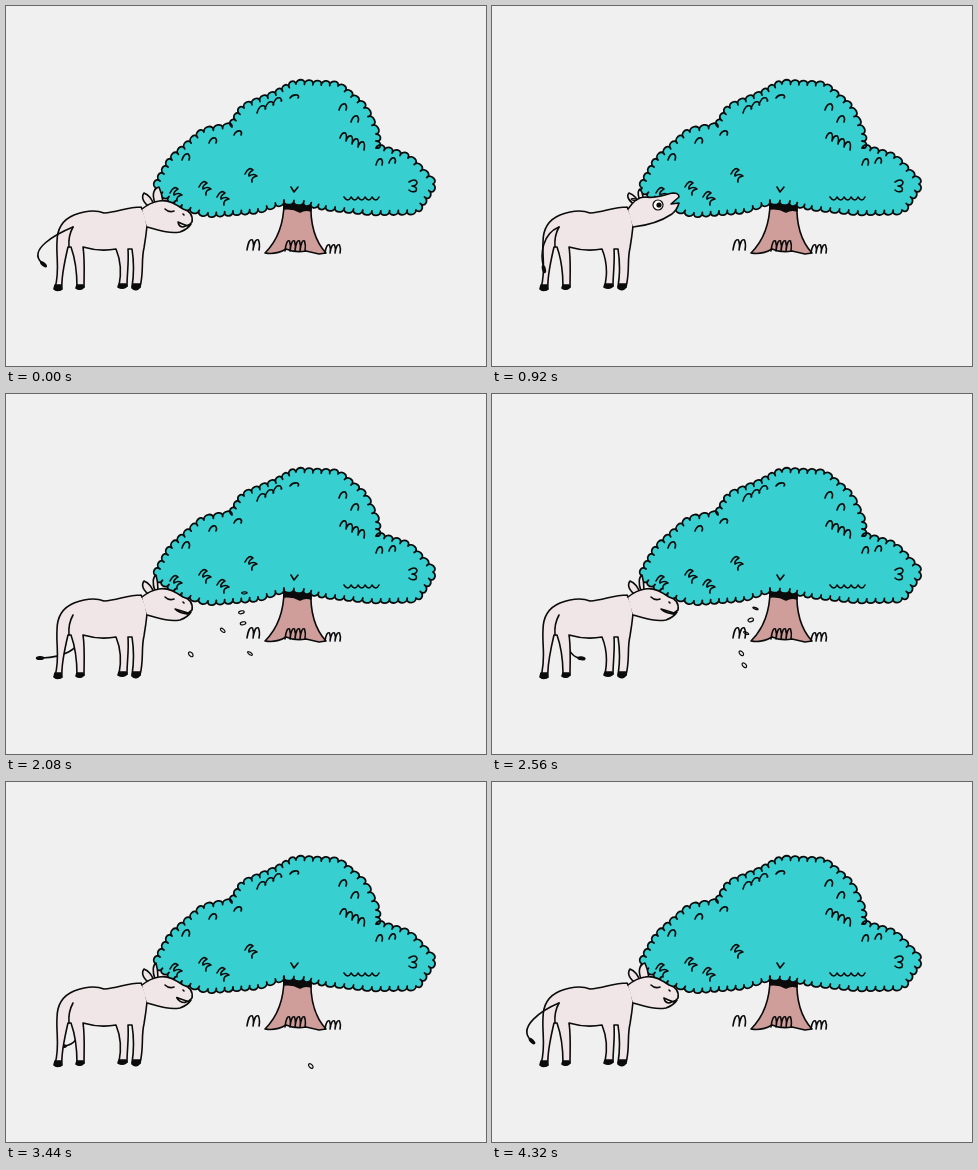
An HTML page for the animation above (4.36 s loop, 480 by 360 pixels).

```html
<!DOCTYPE html>
<html lang="en">
<head>
<meta charset="utf-8">
<title>Donkey and tree</title>
<style>
html, body { margin: 0; width: 100%; height: 100%; overflow: hidden; background: #f0f0f0; }
svg { display: block; width: 100vw; height: 100vh; }
.ink { fill: none; stroke: #0b0b0b; stroke-width: 1.6; stroke-linecap: round; stroke-linejoin: round; }
.skin { fill: #f0e6e7; }
.solid { fill: #0b0b0b; }
.thin { stroke-width: 1.2; }
</style>
</head>
<body>
<svg viewBox="0 0 480 360">
  <g class="ink">
    <path fill="#cf9e9b" d="M278 196C278 219 270 236 259 247Q270 249 280 243Q289 247 300 245L313 248L320 247C308 234 304 217 305 196Z"/>
    <path class="solid" d="M278 195H305V205Q299 203 294 206Q287 202 278 203Z"/>
    <path id="grass"/>
  </g>
  <path id="crown" class="ink" fill="#38cfd0" style="fill:#38cfd0;stroke-width:1.8"/>
  <path id="marks" class="ink"/>

  <g id="back"></g>
  <path class="ink skin" d="M135 201C121 201 112 206 98 207C88 203 76 206 68 209C56 214 51 224 51 236C50 252 54 265 49 282Q52 286 56 283C55 272 58 258 62 241L65 241C70 255 71 268 71 281Q74 285 78 281C78 268 79 254 77 241Q94 246 110 243Q117 260 113 280Q117 283 121 280C121 268 123 256 122 243L126 243Q129 262 126 281Q130 285 134 281C138 266 135 254 138 242Q140 230 141 220Q140 208 135 201"/>
  <path class="ink" d="M67 221Q62 230 63 241"/>
  <path class="ink solid" d="M49 279H55V283Q51 286 48 283ZM71 279H77L78 281Q74 285 70 282ZM113 278H120L121 280Q117 284 112 281ZM127 278H134V281Q130 286 126 282Z"/>
  <g id="front"></g>

  <g id="tail">
    <path id="tailLine" class="ink"/>
    <ellipse id="tuft" class="solid" rx="4.2" ry="2"/>
  </g>

  <g id="chew" class="ink">
    <path id="farEar" class="skin"/>
    <path class="skin" d="M144 201C137 197 135 191 138 187C143 189 146 193 148 199"/>
    <path id="face" class="skin"/>
    <path d="M159 203Q163 207 168 205M177 208L178 209"/>
  </g>
  <g id="bite" class="ink">
    <path class="skin" d="M144 199C137 196 134 190 137 187C142 189 145 192 147 197M147 192Q145 185 148 183Q151 187 151 191"/>
    <path class="skin" d="M136 203C140 197 146 191 153 191C164 193 174 188 181 187Q187 187 187 191L179 198L187 197Q185 204 180 208C171 214 160 219 141 221"/>
    <circle cx="166" cy="199" r="5" fill="#fff" stroke-width="1.2"/>
    <circle cx="167" cy="199" r="2.6" class="solid" stroke="none"/>
  </g>

  <g id="leaves" class="ink thin"></g>
</svg>
<script>
const LOOP = 4360, STEP = 40, GROUND = 284;
const get = id => document.getElementById(id);
const setPath = (id, d) => get(id).setAttribute('d', d);
const wave = x => Math.cos(2 * Math.PI * x);

// Crown: leafy bumps, leaning forward, along a clockwise outline.
const rim = [[150,182],[166,154],[198,126],[226,121],[238,102],[270,89],[290,78],
  [332,80],[358,102],[370,128],[370,142],[402,152],[427,178],[410,204],[366,205],
  [320,200],[298,195],[278,194],[252,203],[202,207],[176,199]];

function leafy(points) {
  let path = 'M' + points[0];
  points.forEach(([x, y], i) => {
    const [nx, ny] = points[(i + 1) % points.length];
    const length = Math.hypot(nx - x, ny - y), count = Math.round(length / 8.5);
    const dx = (nx - x) / count, dy = (ny - y) / count;
    const out = 6 * count / length;
    for (let k = 0; k < count; k++) {
      path += `c${dy * out} ${-dx * out} ${dx * 1.2 + dy * out} ${dy * 1.2 - dx * out} ${dx} ${dy}`;
    }
  });
  return path + 'Z';
}
setPath('crown', leafy(rim));

// A row of n hooks, each w wide and h tall, climbing by rise.
function hooks(x, y, n, w, h, rise = 0) {
  const hook = `q${w * 0.3} ${-h * 1.2} ${w * 0.9} ${-h}q${w * 0.3} ${h * 0.4} ${w * 0.1} ${h - rise}`;
  return `M${x} ${y}` + hook.repeat(n);
}

setPath('grass', hooks(241, 244, 2, 6, 10) + hooks(279, 245, 4, 5, 10) + hooks(319, 247, 3, 5, 8));

// A slanted squiggle of two strokes.
const squiggle = (x, y) => `M${x} ${y}q4 -8 8 -4q-5 3 -4 6q5 -3 8 0q-6 1 -5 6`;

setPath('marks', [
  hooks(251, 107, 3, 8, 7, 4), hooks(284, 92, 1, 8, 3), hooks(228, 129, 1, 7, 4),
  hooks(203, 137, 1, 7, 5), hooks(176, 154, 1, 7, 6), hooks(333, 104, 1, 7, 6),
  hooks(345, 116, 1, 7, 6), hooks(334, 132, 4, 6, 5, -3),
  hooks(370, 159, 1, 6, 6), hooks(383, 157, 1, 6, 5),
  squiggle(239, 168), squiggle(193, 181), squiggle(211, 191), squiggle(164, 187),
  'M338 191' + 'q4 6 7 0'.repeat(5),
  'M285 181l3 5l4 -5M403 176q6 -4 8 0q0 4 -5 4q6 1 4 5q-4 2 -7 -1'
].join(''));

// Tail swing: -1 is far left, 1 far right.
function swing(t) {
  if (t < 1200) return -0.7 - 0.3 * wave(t / 600);
  return wave((t - 2520) / (t < 2520 ? 880 : 1260));
}

function drawTail(t) {
  const s = swing(t), inFront = t < 1200 || t > 4100;
  const x = 62 + 26 * s, y = 264 + (inFront ? 7 * s : 0);
  const cx = inFront ? x + 5 + 20 * s : (x + 74) / 2, cy = inFront ? y - 13 : 263;
  setPath('tailLine', inFront
    ? `M67 221C50 228 ${cx} ${cy} ${x} ${y}`
    : `M74 240C75 257 ${cx} ${cy} ${x} ${y}`);
  const angle = Math.atan2(y - cy, x - cx);
  get('tuft').setAttribute('transform',
    `translate(${x + 2 * Math.cos(angle)} ${y + 2 * Math.sin(angle)}) rotate(${angle * 180 / Math.PI})`);
  get(inFront ? 'front' : 'back').append(get('tail'));
}

function drawHead(t) {
  const biting = t >= 640 && t < 1680;
  get('chew').style.display = biting ? 'none' : '';
  get('bite').style.display = biting ? '' : 'none';
  if (biting) {
    const rock = 1.2 * Math.sin(2 * Math.PI * (t - 920) / 240);
    get('bite').setAttribute('transform', `rotate(${rock} 141 214)`);
    return;
  }
  const open = t < 640 ? 0.5 - 0.5 * wave(t / 480) : 0.5 + 0.5 * wave((t - 2560) / 510);
  setPath('face', `M136 203C141 199 146 196 153 195C162 193 170 198 177 203
    C184 205 187 210 186 216L182 ${220 - open}Q176 ${218 - open} ${172 - 3 * open} ${216 - open}
    Q173 ${221 - 2 * open} ${177 + 4 * open} ${221 - open}L185 218Q182 223 174 226C163 228 152 224 141 221`);
  const flop = t < 640 || t > 4000 ? 1 : 0;
  setPath('farEar', `M149 197C146 189 147 183 ${150 + 3 * flop} 181Q${152 + 4 * flop} 188 ${152 + 5 * flop} 196`);
}

// Leaves scatter at first, then drift right with the wind.
let seed = 11;
const random = () => (seed = seed * 16807 % 2147483647) / 2147483647;

const leaves = Array.from({ length: 12 }, (_, i) => {
  const u = i / 11, stray = (random() - 0.5) * (1 - u);
  const shape = document.createElementNS('http://www.w3.org/2000/svg', 'ellipse');
  shape.setAttribute('rx', 2.8);
  get('leaves').append(shape);
  return {
    shape, spin: random(),
    born: 860 + 1520 * u ** 1.3,
    life: 900 + 640 * u ** 8,
    x: 170 + 85 * u + 50 * stray,
    y: 200 - 40 * random() * (1 - u),
    vx: 0.047 * u + 0.1 * stray,
    vy: 0.1 - 0.02 * u
  };
});

function drawLeaf(leaf, t) {
  const age = t - leaf.born;
  const alive = age >= 0 && age < leaf.life;
  leaf.shape.style.display = alive ? '' : 'none';
  if (!alive) return;
  const x = leaf.x + leaf.vx * age, y = Math.min(GROUND, leaf.y + leaf.vy * age);
  const turn = leaf.spin + age / 520;
  leaf.shape.setAttribute('ry', 1.3 + 0.5 * wave(turn));
  leaf.shape.setAttribute('transform', `translate(${x} ${y}) rotate(${15 + 35 * wave(turn / 2)})`);
}

function draw(t) {
  drawTail(t);
  drawHead(t);
  leaves.forEach(leaf => drawLeaf(leaf, t));
}

const start = performance.now();
function tick() {
  const t = (performance.now() - start) % LOOP;
  draw(Math.floor(t / STEP) * STEP);
  requestAnimationFrame(tick);
}
draw(0);
requestAnimationFrame(tick);
</script>
</body>
</html>
```
